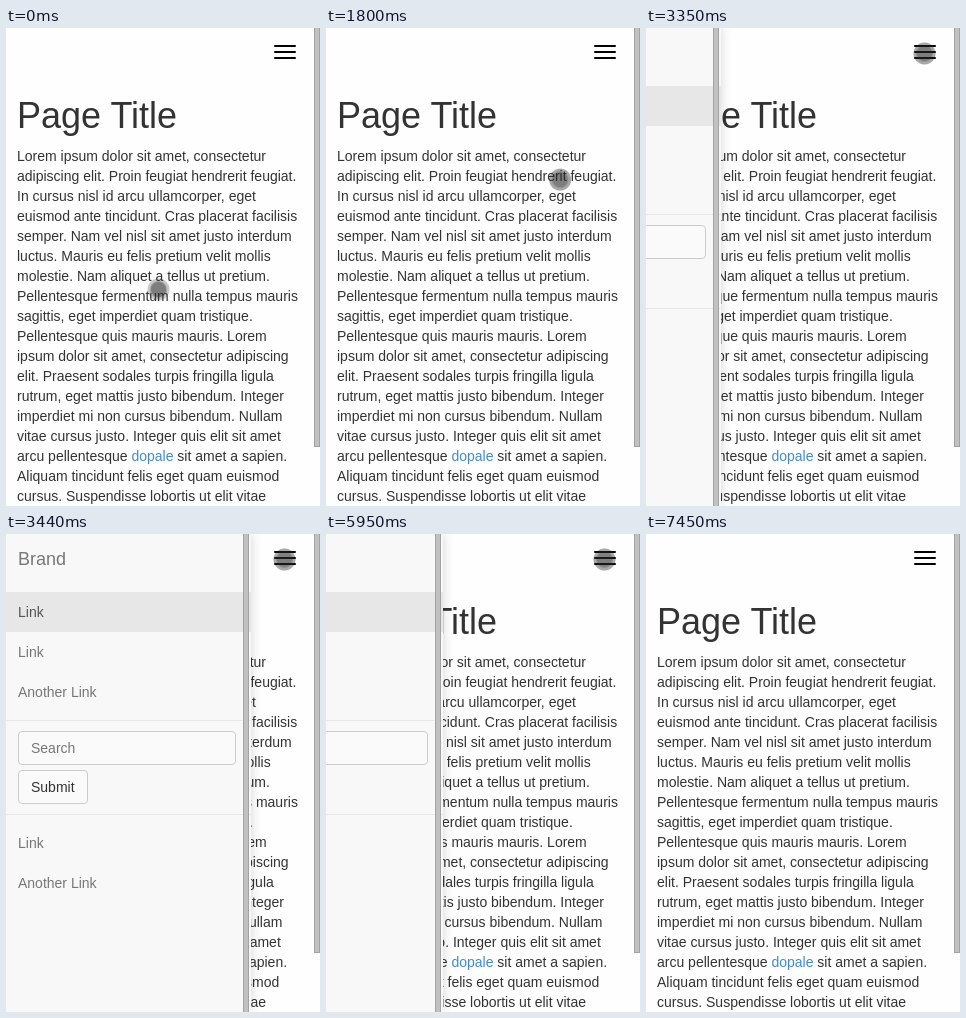
An HTML page that plays this animation: 314x478 px, repeating every 7.99 s.

```html
<!DOCTYPE html>
<html lang="en">
<head>
<meta charset="utf-8">
<title>Off-canvas menu</title>
<style>
  * { box-sizing: border-box; }
  html, body { margin: 0; width: 100%; height: 100%; overflow: hidden; }
  body { position: relative; background: #fefefe; color: #333; font: 14px/20px "Liberation Sans", Arial, sans-serif; }
  body > *, #drawer > * { position: absolute; white-space: pre; }
  h1 { left: 11px; top: 68.4px; margin: 0; font-size: 36px; font-weight: 400; line-height: 39.6px; }
  p { left: 11px; top: 118px; margin: 0; }
  p span { color: #428bca; }
  .bar { left: 268px; width: 22px; height: 2px; border-radius: 1px; background: #000; }
  .thumb { width: 6px; background: #c1c1c1; border: solid #a3a3a3; border-width: 0 1px; }
  #drawer { left: 0; top: 0; width: 245px; height: 478px; background: #f8f8f8; color: #777; box-shadow: 0 0 10px rgba(0, 0, 0, .16); }
  .row { left: 0; width: 245px; height: 40px; padding: 10px 12px; }
  .active { background: #e7e7e7; color: #555; }
  .rule { left: 0; width: 245px; height: 1px; background: #e7e7e7; }
  .box { left: 12px; height: 34px; padding: 6px 12px; border: 1px solid #ccc; border-radius: 4px; background: #fafafa; }
  #cursor { left: -12px; top: -12px; width: 24px; height: 24px; border-radius: 50%; }
</style>
</head>
<body>
<h1>Page Title</h1>
<p>Lorem ipsum dolor sit amet, consectetur
adipiscing elit. Proin feugiat hendrerit feugiat.
In cursus nisl id arcu ullamcorper, eget
euismod ante tincidunt. Cras placerat facilisis
semper. Nam vel nisl sit amet justo interdum
luctus. Mauris eu felis pretium velit mollis
molestie. Nam aliquet a tellus ut pretium.
Pellentesque fermentum nulla tempus mauris
sagittis, eget imperdiet quam tristique.
Pellentesque quis mauris mauris. Lorem
ipsum dolor sit amet, consectetur adipiscing
elit. Praesent sodales turpis fringilla ligula
rutrum, eget mattis justo bibendum. Integer
imperdiet mi non cursus bibendum. Nullam
vitae cursus justo. Integer quis elit sit amet
arcu pellentesque <span>dopale</span> sit amet a sapien.
Aliquam tincidunt felis eget quam euismod
cursus. Suspendisse lobortis ut elit vitae</p>
<div class="bar" style="top:17px"></div>
<div class="bar" style="top:23px"></div>
<div class="bar" style="top:29px"></div>
<div class="thumb" style="left:308px;top:0;height:419px;border-bottom-width:1px"></div>
<div id="drawer">
  <div class="row" style="top:5px;font-size:18px">Brand</div>
  <div class="row active" style="top:58px">Link</div>
  <div class="row" style="top:98px">Link</div>
  <div class="row" style="top:138px">Another Link</div>
  <div class="rule" style="top:186px"></div>
  <div class="box" style="top:197px;width:218px">Search</div>
  <div class="box" style="top:236px;width:70px;color:#333">Submit</div>
  <div class="rule" style="top:280px"></div>
  <div class="row" style="top:289px">Link</div>
  <div class="row" style="top:329px">Another Link</div>
  <div class="thumb" style="left:237px;top:0;height:478px"></div>
</div>
<div id="cursor"></div>
<script>
const LOOP = 7990, STEP = 30, HIDDEN = -262;
const drawer = document.getElementById('drawer');
const cursor = document.getElementById('cursor');

const easeIn = k => p => p ** k;
const easeOut = k => p => 1 - (1 - p) ** k;
const smooth = p => p * p * (3 - 2 * p);

// Pointer moves: start, end, x, y, easing
const moves = [
  [1080, 1270, 153.5, 263, smooth],
  [1390, 1800, 234, 152, easeIn(1.3)],
  [1800, 2210, 278.5, 60.5, easeOut(1.6)],
  [2210, 2480, 278.5, 25.5, smooth],
];

const progress = (t, start, end) => Math.min(1, Math.max(0, (t - start) / (end - start)));

function pointerAt(t) {
  let x = 152.5, y = 261.5;
  for (const [start, end, toX, toY, ease] of moves) {
    const p = ease(progress(t, start, end));
    x += (toX - x) * p;
    y += (toY - y) * p;
  }
  const exit = progress(t, 7190, 7450);
  return [x + 16 * exit - 25 * exit * exit, y + 470 * exit ** 1.8];
}

function drawerAt(t) {
  if (t < 3320 || t >= 6010) return HIDDEN;
  if (t < 3440) {
    const stepped = 3320 + Math.floor((t - 3320) / STEP) * STEP;
    return HIDDEN * (1 - smooth(progress(stepped, 3290, 3440)));
  }
  if (t < 5860) return 0;
  const step = Math.floor((t - 5860) / STEP) + 1;
  return -5 * step ** 2.34;
}

function draw(now) {
  const t = now % LOOP;
  const [x, y] = pointerAt(t);
  const rim = t < 1110 ? .25 : .4;
  cursor.style.transform = `translate(${x}px, ${y}px)`;
  cursor.style.background = `radial-gradient(circle, rgba(40,40,40,.6) 7px, rgba(40,40,40,${rim}) 9px,
    rgba(40,40,40,${rim}) 10.5px, transparent 11.5px)`;
  cursor.style.visibility = t < 7450 ? 'visible' : 'hidden';
  const offset = drawerAt(t);
  drawer.style.transform = `translateX(${Math.round(offset)}px)`;
  drawer.style.visibility = offset > HIDDEN ? 'visible' : 'hidden';
}

const origin = performance.now();
function tick() {
  draw(performance.now() - origin);
  requestAnimationFrame(tick);
}
tick();
</script>
</body>
</html>
```
